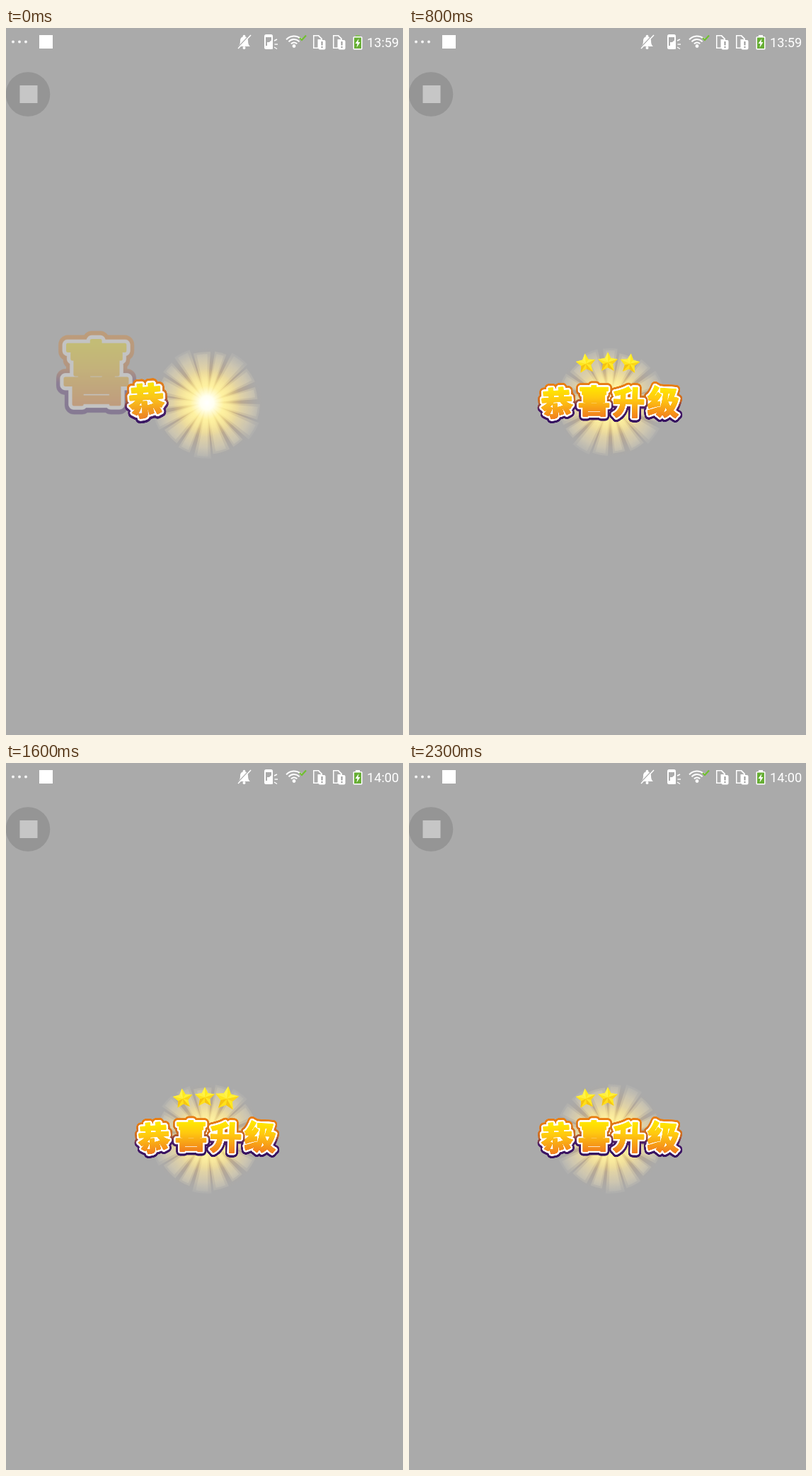
These frames come from a looping animation (561 px wide and 998 px high, 2.4 s). An HTML page with a canvas:

```html
<!DOCTYPE html>
<html lang="zh">
<head>
<meta charset="utf-8">
<style>
html, body { margin: 0; width: 100%; height: 100%; overflow: hidden; background: #aaa; }
canvas { display: block; }
</style>
</head>
<body>
<canvas id="stage" width="561" height="998"></canvas>
<script>
const ctx = document.getElementById('stage').getContext('2d');
const LOOP = 2400, STEP = 100, TAU = Math.PI * 2;

// Piecewise linear curve through [x, y] points
function curve(points, x) {
  if (x <= points[0][0]) return points[0][1];
  for (let i = 1; i < points.length; i++) {
    const [x0, y0] = points[i - 1], [x1, y1] = points[i];
    if (x <= x1) return y0 + (y1 - y0) * (x - x0) / (x1 - x0);
  }
  return points[points.length - 1][1];
}

// Progress of the title sequence over the loop: three runs
const progress = [
  [0, 1.1], [300, 5.1], [800, 11],
  [900, 0.05], [1200, 4.1], [1600, 8.1], [1800, 11],
  [1900, 1.1], [2200, 5.1], [2300, 6.9]
];
const letterScale = [[0, 2.3], [0.1, 2.1], [1.1, 1.12], [2.1, 0.83], [2.6, 0.96], [3.1, 1]];
const starScale = [[0, 2.6], [0.1, 2.5], [1.1, 1.2], [1.4, 1]];

const letters = [
  { char: '级', x: 359.5, y: 528, turn: 0.06, start: 1.6 },
  { char: '升', x: 310.5, y: 528.5, turn: 0.02, start: 2 },
  { char: '喜', x: 261.5, y: 526.5, turn: 0, start: 1 },
  { char: '恭', x: 209, y: 529.5, turn: -0.07, start: 0 }
];
const stars = [
  { x: 250, y: 474, turn: -0.1, start: 4 },
  { x: 281, y: 472, turn: 0, start: 5.3 },
  { x: 312, y: 474, turn: 0.12, start: 7 }
];

const SPRITE = 72, ZOOM = 3;
function makeLetter(char) {
  const cv = document.createElement('canvas');
  cv.width = cv.height = SPRITE * ZOOM;
  const g = cv.getContext('2d');
  g.scale(ZOOM, ZOOM);
  g.translate(SPRITE / 2, SPRITE / 2);
  g.font = '900 45px "Noto Sans CJK SC", "Noto Sans CJK", "Noto Sans CJK JP", sans-serif';
  g.textAlign = 'center';
  g.lineJoin = 'round';
  const ramp = (...stops) => {
    const r = g.createLinearGradient(0, -24, 0, 26);
    stops.forEach(([at, color]) => r.addColorStop(at, color));
    return r;
  };
  const edge = ramp([0, '#e87d12'], [0.42, '#c96a24'], [0.62, '#4a1d68'], [1, '#351060']);
  const face = ramp([0.1, '#ffe600'], [0.4, '#ffc810'], [0.9, '#f2811d']);
  const layer = (color, width, y) => {
    g.strokeStyle = color;
    g.lineWidth = width;
    g.strokeText(char, 0, 17 + y);
  };
  layer(edge, 12.5, 0.8);
  layer(edge, 12.5, -0.4);
  layer('#fff', 7.4, 0);
  layer(face, 2.4, 0);
  g.fillStyle = face;
  g.fillText(char, 0, 17);
  return cv;
}
letters.forEach(l => { l.sprite = makeLetter(l.char); });

function shape(points, color) {
  ctx.beginPath();
  points.forEach(([x, y]) => ctx.lineTo(x, y));
  ctx.closePath();
  ctx.fillStyle = color;
  ctx.fill();
}
function disc(x, y, r, color) {
  ctx.beginPath();
  ctx.arc(x, y, r, 0, TAU);
  ctx.fillStyle = color;
  ctx.fill();
}
function box(x, y, w, h, color, r = 0) {
  ctx.beginPath();
  ctx.roundRect(x, y, w, h, r);
  ctx.fillStyle = color;
  ctx.fill();
}
function line(points, color, width) {
  ctx.beginPath();
  points.forEach(([x, y]) => ctx.lineTo(x, y));
  ctx.strokeStyle = color;
  ctx.lineWidth = width;
  ctx.stroke();
}
function radial(r, stops) {
  const g = ctx.createRadialGradient(0, 0, 0, 0, 0, r);
  stops.forEach(([at, color]) => g.addColorStop(at, color));
  return g;
}

function drawGlow(turn) {
  ctx.save();
  ctx.translate(284, 529);
  disc(0, 0, 78, radial(78, [
    [0, '#fff6b0'], [0.25, 'rgba(244,212,120,0.95)'], [0.5, 'rgba(206,174,122,0.8)'],
    [0.75, 'rgba(182,166,146,0.6)'], [1, 'rgba(174,170,164,0)']
  ]));
  ctx.rotate(turn);
  const beam = radial(79, [
    [0, '#fff'], [0.3, 'rgba(255,242,170,0.7)'], [0.55, 'rgba(244,230,170,0.5)'],
    [0.8, 'rgba(224,216,186,0.38)'], [1, 'rgba(204,202,192,0.14)']
  ]);
  // Nested wedges give each beam soft sides
  const count = 17;
  for (let i = 0; i < count; i++) {
    const a = i / count * TAU, half = 0.13 + 0.03 * Math.sin(i * 2.3);
    for (const [wide, cut] of [[1.15, 0], [0.75, 3]]) {
      ctx.beginPath();
      ctx.moveTo(0, 0);
      ctx.arc(0, 0, 75 + 4 * Math.sin(i * 1.9) - cut, a - half * wide, a + half * wide);
      ctx.fillStyle = beam;
      ctx.fill();
    }
  }
  disc(0, 0, 48, radial(48, [
    [0, '#fff'], [0.2, '#fffff0'], [0.5, 'rgba(255,244,160,0.7)'], [1, 'rgba(255,232,130,0)']
  ]));
  ctx.restore();
}

function drawStar(star, v) {
  const age = v - star.start;
  if (age < 0) return;
  const s = curve(starScale, age);
  ctx.save();
  ctx.translate(star.x, star.y);
  ctx.rotate(star.turn);
  ctx.scale(s, s);
  ctx.globalAlpha = 1 - (s - 1) * 0.1;
  const at = (i, r) => {
    const a = -Math.PI / 2 + i * Math.PI / 5;
    return [Math.cos(a) * r, Math.sin(a) * r];
  };
  const rim = [...Array(10).keys()].map(i => at(i, i % 2 ? 7.3 : 14.6));
  shape(rim, '#ffe01c');
  const shades = ['#ffea1e', '#fff238', '#fbd518', '#ffe924', '#f6c512',
                  '#ffdf1c', '#f5c210', '#ffe51e', '#fff040', '#fff44a'];
  rim.forEach((p, i) => shape([[0, 0], p, rim[(i + 1) % 10]], shades[i]));
  ctx.restore();
}

function drawLetter(letter, v) {
  const age = v - letter.start;
  if (age < 0) return;
  const s = curve(letterScale, age), far = Math.max(0, (s - 1) / 1.1) ** 1.15;
  ctx.save();
  ctx.translate(letter.x - 134 * far, letter.y - 40 * far);
  ctx.rotate(letter.turn);
  ctx.scale(s, s);
  ctx.globalAlpha = Math.max(0.2, 1 - far * 0.7);
  ctx.drawImage(letter.sprite, -SPRITE / 2, -SPRITE / 2, SPRITE, SPRITE);
  ctx.restore();
}

function drawSim(x) {
  shape([[x, 10], [x + 8, 10], [x + 13, 15], [x + 13, 29], [x, 29]], '#fff');
  shape([[x + 1.5, 11.5], [x + 7, 11.5], [x + 11.5, 16], [x + 6.5, 16], [x + 6.5, 27.5], [x + 1.5, 27.5]], '#aaa');
  box(x + 7.5, 17, 10, 13.5, '#fff', 2);
  box(x + 11.5, 19, 2, 5.5, '#999');
  box(x + 11.5, 26, 2, 2, '#999');
}

function drawBar(t, capOn) {
  [10, 19, 28].forEach(x => disc(x, 19.5, 2, '#f4f4f4'));
  box(47, 10, 19, 19, '#fff');

  // Muted bell
  ctx.beginPath();
  ctx.moveTo(328, 26);
  ctx.quadraticCurveTo(331, 24, 331, 18);
  ctx.bezierCurveTo(331, 10, 342, 10, 342, 18);
  ctx.quadraticCurveTo(342, 24, 345, 26);
  ctx.closePath();
  ctx.fillStyle = '#fff';
  ctx.fill();
  disc(336.5, 11.5, 1.8, '#fff');
  disc(336.5, 28, 2, '#fff');
  line([[327.5, 27.5], [344.5, 9.5]], '#aaa', 1.2);
  line([[328, 29], [346, 10]], '#fff', 1.5);

  // Phone with speaker
  box(365, 9, 12, 21, '#fff', 2.5);
  box(367, 13, 8, 12, '#aaa');
  shape([[369, 20], [372, 20], [377, 15.5], [377, 30], [372, 26], [369, 26]], '#fff');
  line([[379, 18], [383, 16]], '#fff', 1.4);
  line([[379.5, 23], [384, 23]], '#fff', 1.4);
  line([[379, 27], [383, 29.5]], '#fff', 1.4);

  // Wireless arcs
  [5.5, 10, 14.5].forEach(r => {
    ctx.beginPath();
    ctx.arc(407, 26, r, -Math.PI * 0.77, -Math.PI * 0.23);
    ctx.strokeStyle = '#fff';
    ctx.lineWidth = 2;
    ctx.stroke();
  });
  disc(407, 25.5, 2.4, '#fff');
  line([[415, 14], [418, 17], [424, 10.5]], '#6fc02c', 2);

  drawSim(434);
  drawSim(462);

  // Charging battery
  box(494, 10, 6, 3, capOn ? '#8ac45c' : '#fff');
  box(490.5, 12, 13, 18.5, '#fff', 1.5);
  box(492, 13.5, 10, 15.5, '#67ae35');
  shape([[498.5, 15], [493.5, 22], [496.5, 22], [495.5, 27.5], [500.5, 20], [497.5, 20]], '#fff');

  ctx.fillStyle = '#fff';
  ctx.font = '18.2px Roboto, sans-serif';
  ctx.textAlign = 'left';
  ctx.fillText(t < 1000 ? '13:59' : '14:00', 510, 26.5);
}

function draw(now) {
  const t = Math.floor(now % LOOP / STEP) * STEP;
  const v = curve(progress, t);
  ctx.fillStyle = '#aaa';
  ctx.fillRect(0, 0, 561, 998);
  drawBar(t, v < 2);
  disc(31, 93.5, 31.3, '#959595');
  box(19.5, 81, 25, 25, '#c6c6c6');
  drawGlow(v * 0.16);
  stars.forEach(s => drawStar(s, v));
  letters.forEach(l => drawLetter(l, v));
}

const begin = performance.now();
function tick() {
  draw(performance.now() - begin);
  requestAnimationFrame(tick);
}
draw(0);
requestAnimationFrame(tick);
</script>
</body>
</html>
```
